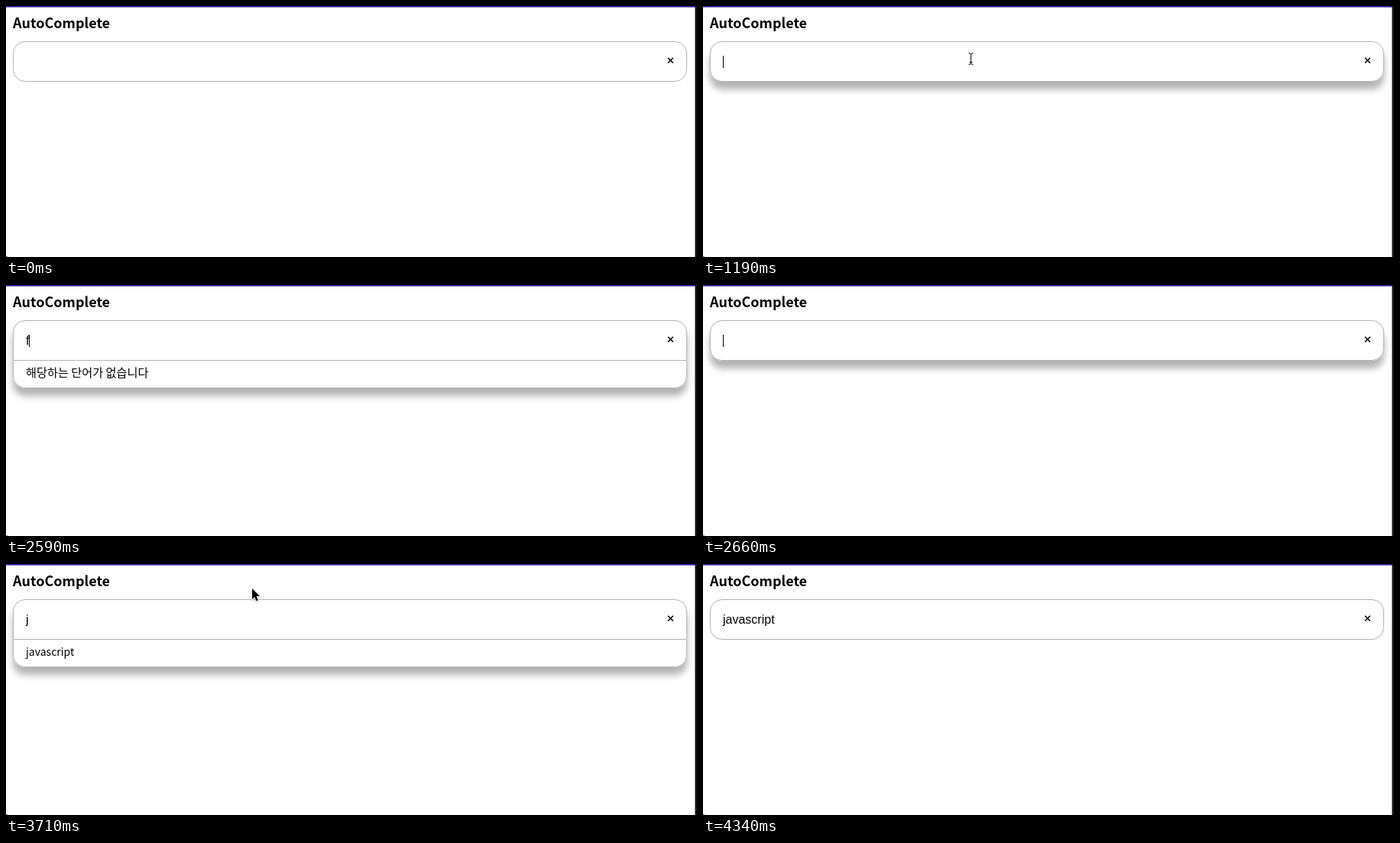
Animation of 904 by 328 pixels, one loop 5.46 s. Source, as an HTML page with a canvas:

```html
<!DOCTYPE html>
<html lang="ko">
<head>
<meta charset="utf-8">
<title>AutoComplete</title>
<style>
  html, body { margin: 0; width: 100%; height: 100%; overflow: hidden; background: #fff; }
  canvas { display: block; width: 904px; height: 328px; }
</style>
</head>
<body>
<canvas id="stage" width="904" height="328"></canvas>
<script>
const ctx = document.getElementById('stage').getContext('2d');
const LOOP = 5460, STEP = 70;
const SANS = '"Noto Sans CJK KR", "Noto Sans CJK", "Noto Sans", sans-serif';
const INPUT_FONT = '16px "Liberation Sans", Arial, sans-serif';
const BORDER = '#b3b3b3';
const BOX = { x: 9, y: 46, w: 882, h: 53 };
const LIST = { x: 9, y: 99, w: 882, h: 36 };

// Pointer path: time, x, y
const PATH = [
  [280, 440, 311], [420, 404, 215], [560, 360, 104], [770, 328, 26],
  [840, 344, 47], [910, 350, 57], [980, 350, 65], [1050, 350, 69], [1540, 350, 69],
  [3500, 348, 66], [3640, 330, 21], [3710, 322, 32], [3850, 310, 92],
  [3920, 309, 115], [3990, 310, 121], [4130, 310, 121], [4200, 228, 172], [4270, 120, 242]
];

const within = (t, a, b) => t >= a && t < b;

function pointerAt(t) {
  let i = 0;
  while (i < PATH.length - 2 && t >= PATH[i + 1][0]) i++;
  const [t0, x0, y0] = PATH[i], [t1, x1, y1] = PATH[i + 1];
  const k = Math.min(1, Math.max(0, (t - t0) / (t1 - t0)));
  return { x: x0 + (x1 - x0) * k, y: y0 + (y1 - y0) * k };
}

function stateAt(t) {
  const p = pointerAt(t);
  return {
    p,
    text: within(t, 1540, 2660) ? 'f' : within(t, 3080, 4060) ? 'j' : t >= 4060 ? 'javascript' : '',
    item: within(t, 1540, 2660) ? '해당하는 단어가 없습니다' : within(t, 3080, 4060) ? 'javascript' : '',
    focused: within(t, 1120, 3990),
    caret: within(t, 1120, 2100) || within(t, 2590, 3640),
    hover: within(t, 3850, 4060) && p.y >= 107,
    pointer: within(t, 280, 1540) || within(t, 3500, 4340),
    press: within(t, 1120, 1190) || within(t, 3990, 4060)
  };
}

function write(text, x, y, font) {
  ctx.font = font;
  ctx.fillStyle = '#000';
  ctx.fillText(text, x, y);
}

function panel(r, radii, shadow) {
  ctx.save();
  if (shadow) {
    ctx.shadowColor = 'rgba(0,0,0,0.3)';
    ctx.shadowBlur = 10;
    ctx.shadowOffsetY = 10;
  }
  ctx.fillStyle = '#fff';
  ctx.beginPath();
  ctx.roundRect(r.x, r.y, r.w, r.h, radii);
  ctx.fill();
  ctx.restore();
}

function outline(r, radii) {
  ctx.strokeStyle = BORDER;
  ctx.lineWidth = 1;
  ctx.beginPath();
  ctx.roundRect(r.x + 0.5, r.y + 0.5, r.w - 1, r.h - 1, radii);
  ctx.stroke();
}

function drawList(s) {
  const { x, y, w, h } = LIST;
  panel(LIST, [0, 0, 16, 16], true);
  if (s.hover) {
    ctx.fillStyle = '#d3d3d3';
    ctx.fillRect(x + 1, y + 8, w - 2, 19);
  }
  ctx.strokeStyle = BORDER;
  ctx.lineWidth = 1;
  ctx.beginPath();
  ctx.moveTo(x + 0.5, y);
  ctx.arcTo(x + 0.5, y + h - 0.5, x + 16, y + h - 0.5, 15.5);
  ctx.arcTo(x + w - 0.5, y + h - 0.5, x + w - 0.5, y, 15.5);
  ctx.lineTo(x + w - 0.5, y);
  ctx.stroke();
  write(s.item, 26, 120, (s.item === 'javascript' ? '14px ' : '15.2px ') + SANS);
}

function drawInput(s) {
  const base = s.item ? 0 : 16;
  panel(BOX, [16, 16, base, base], s.focused);
  if (s.item) drawList(s);
  outline(BOX, [15.5, 15.5, base && 15.5, base && 15.5]);
  write(s.text, 26, 78, INPUT_FONT);
  if (s.caret) {
    ctx.font = INPUT_FONT;
    ctx.fillRect(Math.round(26 + ctx.measureText(s.text).width), 65, 1, 16);
  }
  ctx.strokeStyle = '#000';
  ctx.lineWidth = 1.6;
  ctx.beginPath();
  ctx.moveTo(866, 67.7); ctx.lineTo(872.8, 74.5);
  ctx.moveTo(872.8, 67.7); ctx.lineTo(866, 74.5);
  ctx.stroke();
}

function drawArrow() {
  const shape = new Path2D('M0 0V14L3.2 11L5.4 16.2L7.8 15.2L5.6 10.1H10Z');
  ctx.save();
  ctx.shadowColor = 'rgba(0,0,0,0.3)';
  ctx.shadowBlur = 2;
  ctx.shadowOffsetY = 1;
  ctx.strokeStyle = '#fff';
  ctx.lineWidth = 1.8;
  ctx.stroke(shape);
  ctx.restore();
  ctx.fillStyle = '#000';
  ctx.fill(shape);
}

function drawBeam() {
  ctx.strokeStyle = '#000';
  ctx.lineWidth = 1;
  ctx.stroke(new Path2D('M-2.5 -7.5Q.5 -7.5 .5 -5.5Q.5 -7.5 3.5 -7.5M.5 -5.5V5.5M-2.5 7.5Q.5 7.5 .5 5.5Q.5 7.5 3.5 7.5M-1.5 4.5H2.5'));
}

function drawPointer(s) {
  const { x, y } = s.p;
  ctx.save();
  ctx.translate(Math.round(x), Math.round(y));
  if (s.press) {
    ctx.strokeStyle = '#000';
    ctx.lineWidth = 1.4;
    ctx.beginPath();
    ctx.arc(-1, -0.5, 21.3, 0, Math.PI * 2);
    ctx.stroke();
  }
  if (y >= 63 && y < 82) drawBeam();
  else drawArrow();
  ctx.restore();
}

function drawFrame() {
  ctx.fillStyle = '#fff';
  ctx.fillRect(0, 0, 904, 328);
  ctx.fillStyle = '#30209a';
  ctx.fillRect(0, 0, 902, 1.7);
  ctx.fillStyle = '#141416';
  ctx.fillRect(901.4, 0, 3, 328);
  ctx.fillStyle = '#777';
  ctx.fillRect(0, 327, 2, 1);
  write('AutoComplete', 9, 29, 'bold 18px ' + SANS);
}

function render(now) {
  const t = Math.floor((now % LOOP) / STEP) * STEP;
  const s = stateAt(t);
  drawFrame();
  drawInput(s);
  if (s.pointer) drawPointer(s);
}

const start = performance.now();
function tick() {
  render(performance.now() - start);
  requestAnimationFrame(tick);
}
tick();
</script>
</body>
</html>
```
